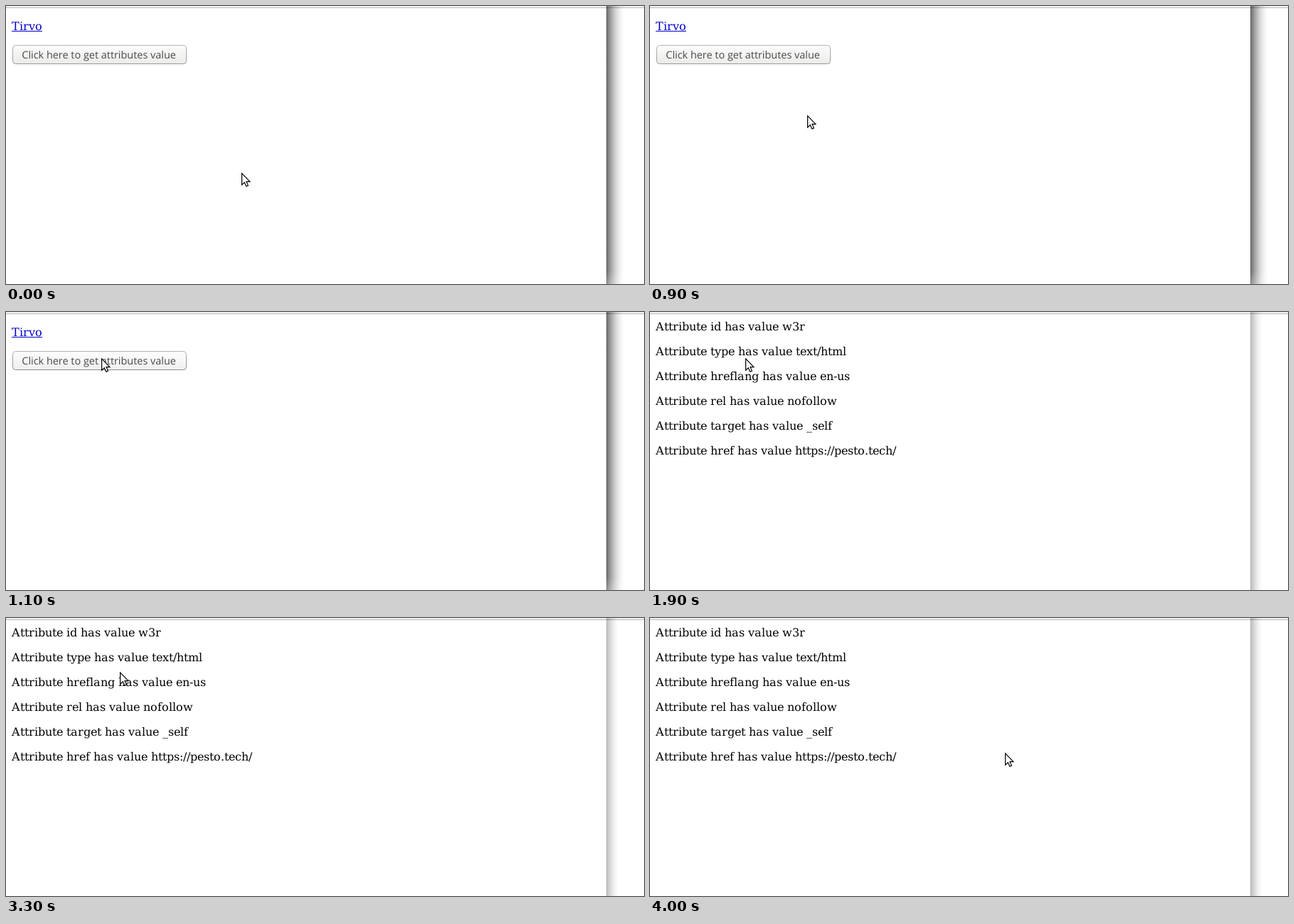
Animation of 897x392 px, one loop 5.7 s. Source, as an HTML page with a canvas:

```html
<!DOCTYPE html>
<html lang="en">
<head>
<meta charset="utf-8">
<title>Link attributes</title>
<style>
html, body { margin: 0; width: 100%; height: 100%; overflow: hidden; background: #fff; }
canvas { display: block; }
</style>
</head>
<body>
<canvas id="stage" width="897" height="392"></canvas>
<script>
const W = 897, H = 392, LOOP = 5700, EDGE = 844;
const HOVER = 1100, PRESS = 1800, RESULT = 1900;
const ctx = document.getElementById('stage').getContext('2d');
const SERIF = '16px "DejaVu Serif", "Noto Serif", serif';
const SANS = '14.45px "Open Sans", "Noto Sans", sans-serif';

const attributes = {
  id: 'w3r',
  type: 'text/html',
  hreflang: 'en-us',
  rel: 'nofollow',
  target: '_self',
  href: 'https://pesto.tech/'
};

// Pointer positions: time, x, y. The pointer jumps from one to the next.
const moves = [
  [0, 331, 235], [600, 240, 171], [700, 231, 168], [900, 221, 154],
  [1100, 134, 65], [3300, 160, 76], [3800, 471, 184], [3900, 492, 189], [4000, 499, 190]
];
const SWEEP = 3300, SWEEP_END = 3800;

function pointerAt(t) {
  const i = moves.findLastIndex(m => m[0] <= t);
  const [, x, y] = moves[i];
  if (t < SWEEP || t >= SWEEP_END) return [x, y];
  const [, x2, y2] = moves[i + 1];
  const p = Math.floor((t - SWEEP) / 100) / 5;
  const k = p + 0.3 * p * (1 - p);
  return [Math.round(x + (x2 - x) * k), Math.round(y + (y2 - y) * k)];
}

// Sets text on whole-pixel advances and returns its right end.
function serifText(str, x, y, color) {
  ctx.font = SERIF;
  ctx.fillStyle = color;
  for (const ch of str) {
    ctx.fillText(ch, x, y);
    x += Math.round(ctx.measureText(ch).width);
  }
  return x;
}

function gradient(x1, y1, x2, y2, stops) {
  const g = ctx.createLinearGradient(x1, y1, x2, y2);
  for (const [at, color] of stops) g.addColorStop(at, color);
  return g;
}

function drawWindow(strong) {
  ctx.fillStyle = '#fff';
  ctx.fillRect(0, 0, W, H);
  ctx.fillStyle = '#f2f1f0';
  ctx.fillRect(0, 0, W, 2);
  ctx.fillStyle = '#bcbbba';
  ctx.fillRect(0, 2, W, 1);

  const size = strong ? 26 : 19, depth = strong ? 0.6 : 0.28;
  const stops = [];
  for (let i = 0; i <= 8; i++) {
    const p = i / 8;
    stops.push([p, `rgba(0,0,0,${depth * (1 - p) ** 1.8})`]);
  }
  ctx.fillStyle = gradient(EDGE, 0, EDGE + size, 0, stops);
  ctx.fillRect(EDGE, 0, size, H);
  if (strong) {
    ctx.fillStyle = gradient(0, 374, 0, H, [[0, 'rgba(255,255,255,0)'], [1, 'rgba(255,255,255,.25)']]);
    ctx.fillRect(EDGE, 374, size, H - 374);
  }
}

function drawButton(hover, pressed) {
  const [top, bottom] = pressed ? ['#dadada', '#ebebeb'] : hover ? ['#fdfdfd', '#efefee'] : ['#fcfcfc', '#ebebe9'];
  ctx.beginPath();
  ctx.roundRect(9.5, 55.5, 244, 26, 4);
  ctx.fillStyle = gradient(0, 55, 0, 82, [[0, top], [1, bottom]]);
  ctx.fill();
  ctx.lineWidth = 1;
  ctx.strokeStyle = pressed ? '#cf6f42' : gradient(0, 55, 0, 82, [[0, '#b4b4b3'], [1, hover ? '#8c8c8b' : '#989897']]);
  ctx.stroke();
  ctx.font = SANS;
  ctx.fillStyle = '#4a4a4a';
  ctx.fillText('Click here to get attributes value', pressed ? 23.3 : 22.3, 74);
}

function drawLink() {
  const end = serifText('Tirvo', 8, 34, '#0000cc');
  ctx.fillRect(8, 35, end - 8, 1);
}

function drawResult() {
  Object.entries(attributes).forEach(([name, value], i) =>
    serifText(`Attribute ${name} has value ${value}`, 8, 26 + 35 * i, '#000'));
}

const arrow = new Path2D('M.6 .9V17.2L4.3 13.7L6.8 19.2L9.4 18.1L7 12.7H11.9Z');

function drawPointer(x, y) {
  ctx.save();
  ctx.translate(x, y);
  ctx.fillStyle = '#fff';
  ctx.fill(arrow);
  ctx.lineWidth = 1.2;
  ctx.strokeStyle = '#000';
  ctx.stroke(arrow);
  ctx.restore();
}

function draw(t) {
  ctx.textRendering = 'geometricPrecision';
  drawWindow(t < PRESS);
  if (t < RESULT) {
    drawLink();
    drawButton(t >= HOVER, t >= PRESS);
  } else {
    drawResult();
  }
  drawPointer(...pointerAt(t));
}

const start = performance.now();
function tick() {
  draw((performance.now() - start) % LOOP);
  requestAnimationFrame(tick);
}
tick();
</script>
</body>
</html>
```
